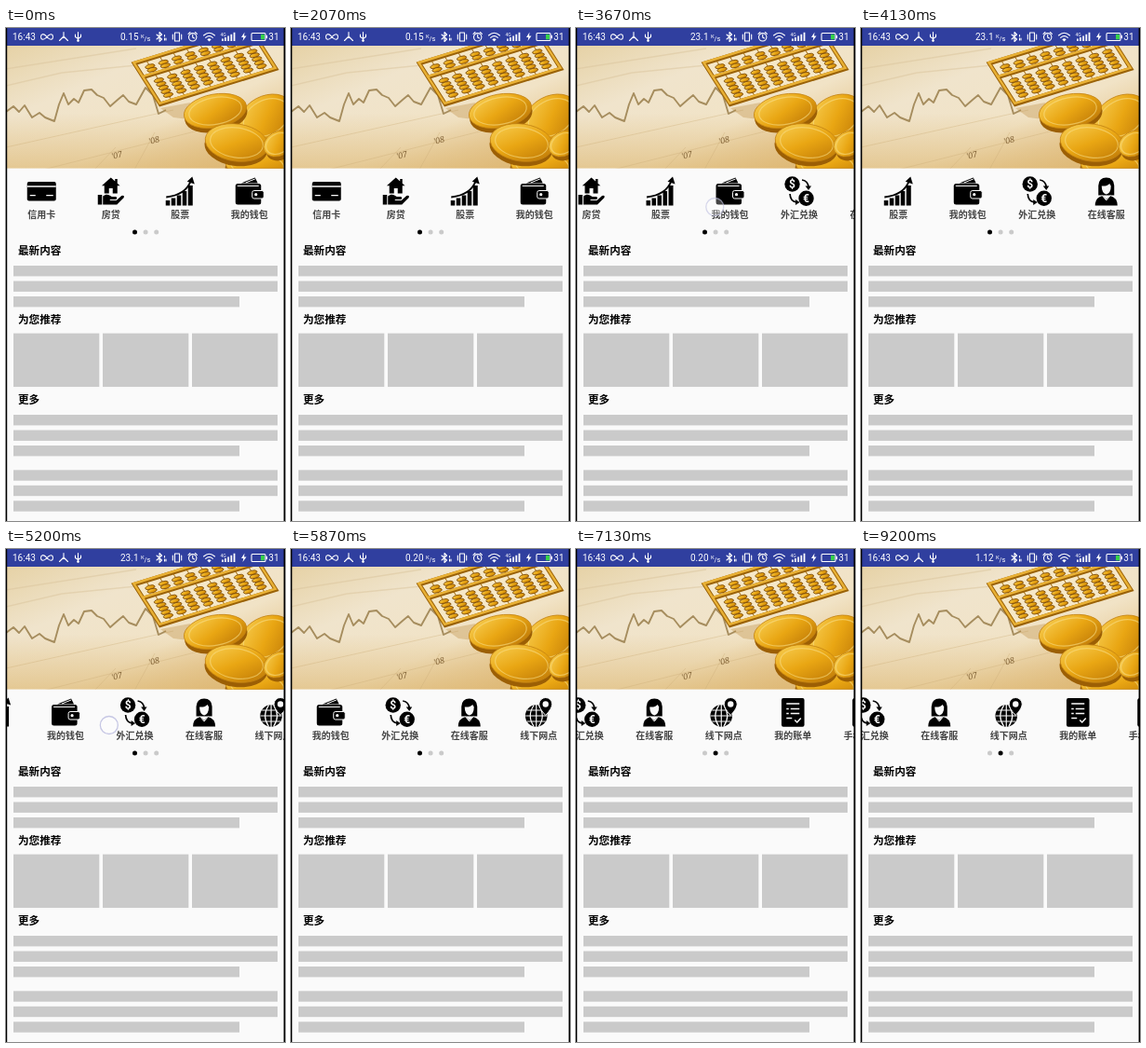
Recreate the animation shown at these times as an HTML page. Size 300x529 px, loop 9.47 s.

```html
<!DOCTYPE html>
<html lang="zh-CN">
<head>
<meta charset="utf-8">
<title>Scrolling menu</title>
<style>
  html, body { margin: 0; width: 100%; height: 100%; overflow: hidden; background: #fafafa; }
  svg { display: block; width: 100vw; height: 100vh; }
  text { font-family: "Noto Sans CJK SC", "Noto Sans CJK", "Noto Sans", sans-serif; }
  .bar text { font-family: Roboto, sans-serif; font-size: 10px; fill: #fff; }
  .line { fill: none; stroke: #fff; stroke-width: 1.1; stroke-linecap: round; stroke-linejoin: round; }
  .label { font-size: 10px; font-weight: 700; fill: #444; text-anchor: middle; }
  .head { font-size: 11.6px; font-weight: 700; fill: #000; }
  .w { fill: #fafafa; }
  .s { fill: none; stroke: #000; }
  .ws { fill: none; stroke: #fafafa; }
  .sign { font: 700 12px Roboto, sans-serif; fill: #fafafa; text-anchor: middle; }
  .year { font: italic 9px "Noto Serif", serif; fill: #806235; }
</style>
</head>
<body>
<svg viewBox="0 0 300 529" preserveAspectRatio="none">
  <defs>
    <linearGradient id="paper" x1="0" y1="0" x2="1" y2="1">
      <stop offset="0" stop-color="#e6d2a6"/>
      <stop offset=".3" stop-color="#f0e4cc"/>
      <stop offset=".6" stop-color="#f1e3c6"/>
      <stop offset="1" stop-color="#dcae62"/>
    </linearGradient>
    <linearGradient id="shade" x1="0" y1="0" x2="0" y2="1">
      <stop offset=".55" stop-color="#dcb670" stop-opacity="0"/>
      <stop offset="1" stop-color="#dcb670" stop-opacity=".6"/>
    </linearGradient>
    <linearGradient id="gold" x1="0" y1="0" x2="1" y2="1">
      <stop offset="0" stop-color="#f9d35a"/>
      <stop offset=".5" stop-color="#e9a613"/>
      <stop offset="1" stop-color="#b87205"/>
    </linearGradient>
    <clipPath id="photoBox"><rect x="1" y="19" width="298" height="131.5"/></clipPath>
  </defs>

  <rect width="300" height="529" fill="#fafafa"/>

  <g clip-path="url(#photoBox)">
    <rect y="19" width="300" height="132" fill="url(#paper)"/>
    <rect y="19" width="300" height="132" fill="url(#shade)"/>
    <g fill="none" stroke-linejoin="round">
      <path d="M0 128L180 88M40 152L215 108M95 152L118 128M138 152L160 112" stroke="#c9a874" stroke-width=".7" opacity=".5"/>
      <path d="M0 44L140 22M0 62L60 48 140 40" stroke="#d9c49c" stroke-width="1.500" opacity=".5"/>
      <path d="M0 90L8 84 14 90 20 83 28 96 36 91 42 96 52 100 57 82 62 70 67 82 73 76 78 80 84 67 92 66 98 72 105 75 112 84 120 77 126 72 132 79 140 82 150 64 158 72 164 92 172 88" stroke="#a68d5e" stroke-width="1.900"/>
    </g>
    <text class="year" transform="translate(114 141) rotate(-14)">'07</text>
    <text class="year" transform="translate(154 125) rotate(-14)">'08</text>
    <path d="M166 86L198 80 196 98 180 96Z" fill="#b98a3c" opacity=".35"/>
    <g id="abacus" transform="translate(138 38) rotate(-17) skewX(15.5)"></g>
    <g id="coins"></g>
  </g>

  <g class="bar">
    <rect width="300" height="19" fill="#303f9f"/>
    <text x="7" y="13">16:43</text>
    <path class="line" d="M44 9.500C40 4.800 37.500 6.800 37.500 9.500S40 14 44 9.500S50.500 6.800 50.500 9.500S48 14 44 9.500Z"/>
    <path class="line" d="M62 4.500V9L57.500 13.500M62 9L66.500 13.500M60.500 10.500H63.500"/>
    <path class="line" d="M77.500 4.500V14M74.500 7V9.500L77.500 11.500 80.500 9.500V7"/>
    <circle cx="77.500" cy="13.500" r="1.300" fill="#fff"/>
    <text id="speed" x="123" y="13"></text>
    <text x="145" y="10.500" style="font-size:6px">K</text>
    <text x="148.500" y="13.500" style="font-size:7.500px">/s</text>
    <path class="line" d="M162 7L167.500 12 165 14.500V4.500L167.500 7 162 12M170.500 7.500V9M172 11V13M170.500 11V13"/>
    <path class="line" d="M181.500 5H186.500V14H181.500ZM179.300 7V12M188.700 7V12"/>
    <g class="line">
      <circle cx="200.700" cy="9.800" r="4.200"/>
      <path d="M200.700 7.300V10L202.500 11M196 6.300L198 4.500M205.400 6.300L203.400 4.500"/>
      <path d="M212.500 8Q218.500 2.500 224.500 8M214.700 10.300Q218.500 7 222.300 10.300"/>
    </g>
    <path d="M216.300 12.200Q218.500 10.300 220.700 12.200L218.500 14.500Z" fill="#fff"/>
    <text x="230.500" y="8.500" style="font-size:5px">4G</text>
    <path d="M232 11.500h1.800v2.500h-1.800zM235 10h1.800v4h-1.800zM238.200 8.500h1.800v5.500h-1.800zM241.400 6.700h1.800v7.300h-1.800zM244.600 4.800h1.800v9.200h-1.800z" fill="#fff"/>
    <path d="M256.500 4.500L253 10H255.300L254.500 14 258.500 8.500H256Z" fill="#fff"/>
    <rect class="line" x="264" y="5.500" width="15" height="8" rx="1"/>
    <rect x="279.500" y="7.800" width="1.500" height="3.400" fill="#fff"/>
    <rect x="274" y="6.800" width="4" height="5.500" fill="#35d04a"/>
    <text x="282.300" y="13">31</text>
  </g>

  <g id="menu"></g>
  <g id="dots"></g>

  <text class="head" x="13" y="243.300">最新内容</text>
  <text class="head" x="13" y="317.300">为您推荐</text>
  <text class="head" x="13" y="402.500">更多</text>
  <g id="blocks" fill="#cacaca"></g>

  <circle id="touch" r="9.500" fill="#fff" fill-opacity=".4" stroke="#c6c7e4" stroke-width="1.300"/>
  <path d="M0 0H1.200V529H0ZM298.600 0H300V529H298.600Z" fill="#000"/>
</svg>

<script>
const $ = id => document.getElementById(id);
const LOOP = 9470, FPS = 15, CELL = 74.5;

const items = [
  ['信用卡', `<rect x="-15.5" y="165" width="31" height="20.5" rx="2"/>
    <path class="w" d="M-15.5 169.2h31v1.6h-31zM-12.5 179h6v1.2h-6zM5 179h7.500v1.200h-7.500z"/>`],
  ['房贷', `<path d="M0 160.500L4.500 164.500V162H7V166.700L9.800 169.300H7V177.500H2V172H-2V177.500H-7V169.300H-9.800Z"/>
    <path d="M-14 179h4.500v10.500h-4.500zM-8.500 180.500C-5 177.500-2 178.500 1 181H5.500Q7.500 182.500 5.500 184H-1V185H6L11.500 180Q15 179 14 182L6.500 189.500H-8.500Z"/>`],
  ['股票', `<path d="M-15.5 185h4.500v5.500h-4.500zM-9.500 182.500h4.500v8h-4.500zM-3.500 179.500h4.500v11h-4.500zM2.500 175h4.500v15.500h-4.500zM8.500 169h5v21.500h-5z"/>
    <path class="s" stroke-width="2" d="M-15 181.500Q6 179 11.500 164"/>
    <path d="M13 159.500L15.500 167.500 7.500 164.700Z"/>`],
  ['我的钱包', `<path d="M-9 166.500L6 160.500 9 166.500Z"/>
    <path class="ws" stroke-width="1" d="M-4 166L6 162"/>
    <rect x="-15" y="167" width="27.5" height="22.500" rx="2.500"/>
    <path class="ws" stroke-width="1" d="M-13 169.500H10"/>
    <rect x="3" y="174.500" width="12.500" height="8.500" rx="2" stroke="#fafafa"/>
    <circle class="w" cx="7" cy="178.700" r="1.600"/>`],
  ['外汇兑换', `<circle cx="-7.500" cy="167.500" r="8.200"/><circle cx="7.500" cy="182.700" r="8.200"/>
    <text class="sign" x="-7.500" y="171.800">$</text><text class="sign" x="7.500" y="187">€</text>
    <path class="s" stroke-width="1.700" d="M3 163Q9.500 164 10 171M-10 178Q-9.500 186-3 187"/>
    <path d="M6.500 169.500H13L10 174ZM-4 184L.5 187-4 190Z"/>`],
  ['在线客服', `<path d="M-8.500 179.500V169Q-8 160.500 0 160.500T8.500 169V179.500Z"/>
    <path class="w" d="M-5 169.500Q1 170 3.500 167L5 169.500Q5 177 0 178.500Q-5 177-5 169.500Z"/>
    <path d="M-12 190.500Q-12 182-4 180L0 184 4 180Q12 182 12 190.500Z"/>
    <path class="ws" stroke-width="1" d="M-4.500 179.500L0 185 4.500 179.500"/>`],
  ['线下网点', `<circle cx="-2.500" cy="179" r="11.800"/>
    <path class="ws" stroke-width="1.200" d="M-14 179H9M-12.500 173H7.500M-12.500 185H7.500M-2.500 167V191M-5 167.500Q-13 179-5 190.500M0 167.500Q8 179 0 190.500"/>
    <path d="M7.500 178.500Q.5 171 .5 166.500A7 7 0 0 1 14.500 166.500Q14.500 171 7.500 178.500Z" stroke="#fafafa"/>
    <circle class="w" cx="7.500" cy="166.500" r="3.200"/>`],
  ['我的账单', `<rect x="-12.300" y="160" width="24.600" height="30.700" rx="2"/>
    <path class="ws" stroke-width="1.500" d="M-7 166H7M-7 171.500H-4.500M-2.500 171.500H7M-7 176.500H-4.500M-2.500 176.500H7M-7 181.500H-1M2 183.500L4.500 186 8.500 181.500"/>`],
  ['手机充值', `<rect x="-10.500" y="160" width="21" height="30.700" rx="2.500"/>
    <rect class="w" x="-8" y="164" width="16" height="21"/><circle class="w" cy="188" r="1.300"/>`]
];

$('menu').innerHTML = items.map(([name, icon], i) =>
  `<g transform="translate(${38.25 + i * CELL} 0)">${icon}<text class="label" y="204.200">${name}</text></g>`).join('');

const block = (x, y, w, h) => `<rect x="${x}" y="${y}" width="${w}" height="${h}"/>`;
const para = y => [284, 284, 243].map((w, i) => block(8, y + i * 16.5, w, 11.4)).join('');
$('blocks').innerHTML = [255, 415, 474.300].map(para).join('') +
  [8, 104, 200].map(x => block(x, 327.600, 92.300, 57.500)).join('');

$('dots').innerHTML = [0, 1, 2].map(i => `<circle cx="${138.5 + i * 11.6}" cy="219" r="2.500"/>`).join('');

// Banner illustration
let beads = '<rect width="130" height="50" fill="#f7e9c8" opacity=".85"/>';
for (let i = 0; i < 8; i++) {
  const x = 13 + i * 15;
  beads += `<path d="M${x} 0V50" stroke="#a8741a"/>`;
  for (const y of [8, 12, 25, 29.5, 34, 38.5, 43]) {
    beads += `<ellipse cx="${x}" cy="${y}" rx="5.200" ry="2.200" fill="url(#gold)" stroke="#7d4a06" stroke-width=".8"/>`;
  }
}
$('abacus').innerHTML = beads + `<g fill="none">
  <path d="M0 0H130V50H0ZM0 17H130" stroke="#9a6208" stroke-width="4.500"/>
  <path d="M0-1H130V49H0ZM0 16H130" stroke="#e9b135" stroke-width="2.500"/></g>`;

const coin = ([x, y, rx, ry, tilt]) => `<g transform="translate(${x} ${y}) rotate(${tilt})">
  <ellipse cy="5" rx="${rx}" ry="${ry}" fill="#9c5f04"/>
  <ellipse rx="${rx}" ry="${ry}" fill="url(#gold)" stroke="#c58412" stroke-width=".8"/>
  <ellipse rx="${rx * .84}" ry="${ry * .8}" fill="none" stroke="#f9de85" stroke-width="1.200" opacity=".6"/></g>`;
$('coins').innerHTML = [
  [270, 147, 34, 16, 5], [280, 96, 31, 23, -28], [225, 89, 34, 18, -10],
  [248, 123, 34, 20, 8], [293, 124, 17, 13, -30]
].map(coin).join('');

// Swipes: touch time, first movement, rest, scroll from, scroll to, finger x, finger y
const swipes = [
  [2067, 2133, 2930, 0, 71, 157, 189],
  [3530, 3600, 4130, 71, 147, 174.5, 192],
  [4930, 5000, 5600, 147, 219, 161.5, 189],
  [6267, 6300, 6930, 219, 326.5, 158.5, 180]
];
const speeds = [[0, '0.15'], [2860, '23.1'], [5860, '0.20'], [8925, '1.12']];
const clamp = v => Math.min(1, Math.max(0, v));
const fling = u => 1 - (1 - u) ** 3;
// The touch marker gains strength, holds, then fades on release
const touchAlpha = dt => clamp(dt / 200) * clamp((480 - dt) / 130);

function render(now) {
  const t = Math.floor((now % LOOP + 3.4) * FPS / 1000) * 1000 / FPS;
  let scroll = 0, alpha = 0;
  for (const [touch, start, end, from, to, x, y] of swipes) {
    if (t < touch) break;
    scroll = from + (to - from) * fling(clamp((t - start) / (end - start)));
    alpha = touchAlpha(t - touch);
    $('touch').setAttribute('transform', `translate(${x - scroll + from} ${y})`);
  }
  $('touch').setAttribute('opacity', clamp(alpha));
  $('menu').setAttribute('transform', `translate(${-scroll} 0)`);
  const page = Math.floor(scroll / (CELL * 4));
  [...$('dots').children].forEach((dot, i) => dot.setAttribute('fill', i === page ? '#000' : '#cacaca'));
  $('speed').textContent = speeds.findLast(([from]) => t >= from)[1];
}

function tick() {
  render(performance.now());
  requestAnimationFrame(tick);
}
tick();
</script>
</body>
</html>
```
